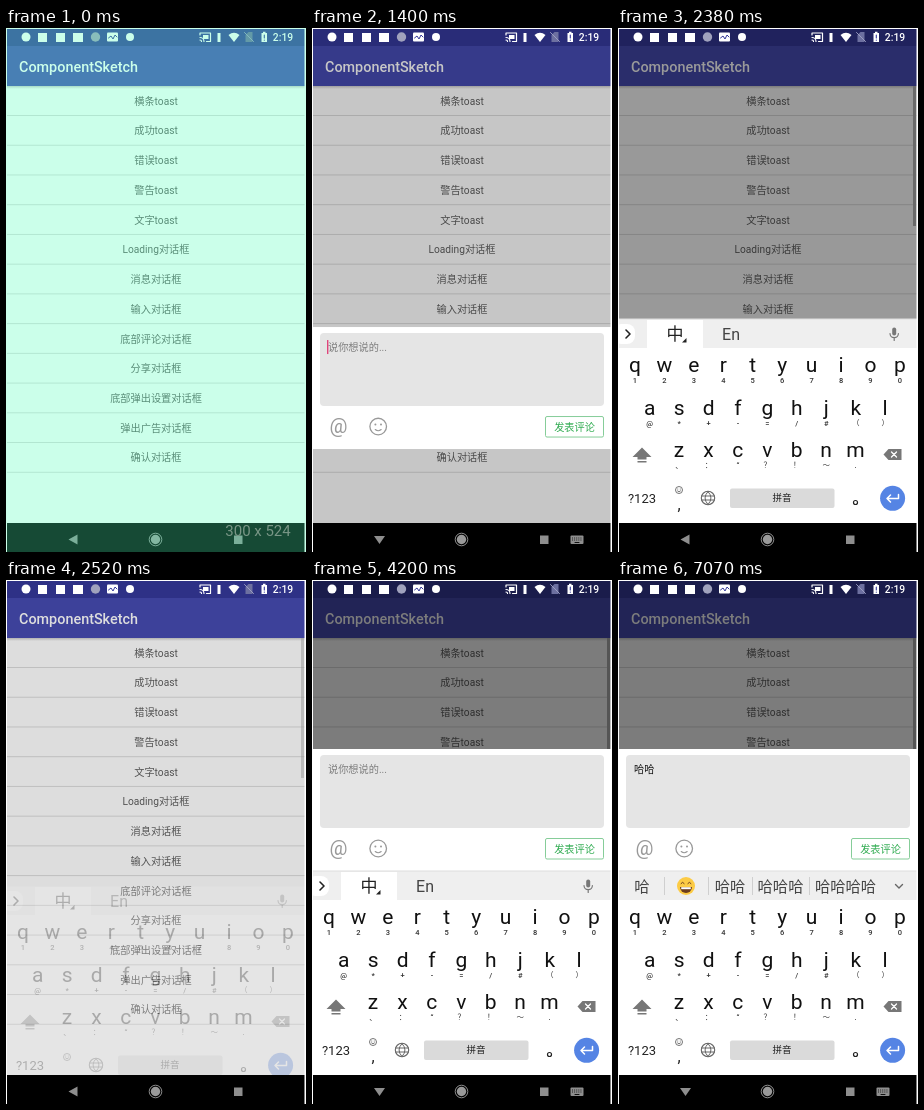
Animation of 300x524 px, one loop 7210 ms. Source, as an HTML page:

```html
<!DOCTYPE html>
<html lang="zh-CN">
<head>
<meta charset="utf-8">
<style>
html, body { margin: 0; width: 100%; height: 100%; overflow: hidden; background: #fff; }
svg { display: block; width: 100%; height: 100%; }
text { font-family: Roboto, "Noto Sans CJK SC", "Noto Sans CJK", sans-serif; text-anchor: middle; white-space: pre; }
.line { fill: none; stroke-linecap: round; stroke-linejoin: round; }
</style>
</head>
<body>
<svg id="stage" viewBox="0 0 300 524"></svg>
<script>
const LOOP = 7210, STEP = 70, ROW = 29.73, DIM = 0.515;
const stage = document.getElementById('stage');

// --- markup helpers ---
const rect = (x, y, w, h, fill, more = '') =>
  `<rect x="${x}" y="${y}" width="${w}" height="${h}" fill="${fill}" ${more}/>`;
const disc = (x, y, r, fill, more = '') => `<circle cx="${x}" cy="${y}" r="${r}" fill="${fill}" ${more}/>`;
const shape = (d, fill) => `<path d="${d}" fill="${fill}"/>`;
const line = (d, color, w = 1.3, more = '') =>
  `<path class="line" d="${d}" stroke="${color}" stroke-width="${w}" ${more}/>`;
// y is the vertical middle of the glyphs
const text = (s, x, y, size, fill, more = '') =>
  `<text x="${x}" y="${y + size * 0.365}" font-size="${size}" fill="${fill}" ${more}>${s}</text>`;
const group = (id, body) => `<g id="${id}">${body}</g>`;
const left = 'style="text-anchor:start"';
const medium = 'font-weight="500"';

// --- list screen ---
const rows = ['横条toast', '成功toast', '错误toast', '警告toast', '文字toast', 'Loading对话框', '消息对话框',
  '输入对话框', '底部评论对话框', '分享对话框', '底部弹出设置对话框', '弹出广告对话框', '确认对话框'];

const screen = rect(0, 0, 300, 524, '#fff') + rect(0, 1, 300, 17, '#35399a') +
  rect(0, 58, 300, 3, 'url(#shade)') + rect(0, 18, 300, 40, '#464bb2') +
  text('ComponentSketch', 13, 38.5, 14.4, '#fff', left + medium) +
  rect(1, 297, 297, 29, '#efefef', 'id="pressed"') +
  rows.map((s, i) => text(s, 150, 73 + ROW * i, 10.2, '#5e5e5e') +
    rect(0, 87 + ROW * i, 300, 1, '#dcdcdc')).join('') +
  rect(295, 58, 3, 140, '#b0b0b0', 'id="scrollbar"');

const status = disc(20, 9, 4.5, '#fff') + rect(32, 5, 9, 9, '#fff') + rect(50, 5, 9, 9, '#fff') +
  rect(67, 5, 10, 9, '#fff') + disc(89.5, 9, 4.7, '#a0a2bd') +
  rect(101, 4.5, 11, 9, '#fff', 'rx="1"') + line('M102.5 10l2.5-2 2 3 2-4 2 2', '#35399a', 1) +
  disc(124, 9, 4, '#fff') +
  line('M194 7V5h10.5v8.500h-4M194 9.500a4 4 0 0 1 4 4M194 12a1.500 1.500 0 0 1 1.500 1.500', '#fff', 1.2) +
  rect(197, 7, 5.500, 4, '#fff') +
  rect(211.5, 5, 3, 9, '#fff') +
  shape('M222.5 7q5.500-4.500 11 0L228 14z', '#fff') +
  shape('M239.5 7l3-3h4v10h-7z', '#6d70a0') + line('M238.5 4.500l9 9', '#9a9cc0', 1) +
  shape('M255.5 5h1.500v-1.200h2.500V5h1.500v9h-5.500z', '#fff') +
  line('M258.3 7v3M258.3 12v.2', '#35399a', 1.1) +
  text('2:19', 277, 9.5, 10.3, '#fff', medium);

const nav = rect(0, 495, 300, 29, '#000') +
  group('backIcon', shape('M62.5 511.500l9-5v10z', '#8e8e8e')) +
  group('imeIcons', shape('M62 508h11l-5.500 8z', '#8e8e8e') +
    rect(258.5, 507.5, 13, 8.5, '#8e8e8e', 'rx="1"') +
    line('M260.5 510h9M260.5 512h9', '#111', 1, 'stroke-dasharray="0.1 2"') +
    line('M263 514.500h4', '#111', 1)) +
  disc(149.5, 511.5, 6.3, 'none', 'stroke="#8e8e8e"') + disc(149.5, 511.5, 4.7, '#9a9a9a') +
  rect(228, 507.5, 8.5, 8.5, '#8e8e8e');

// --- comment sheet, laid out at its resting place ---
const sheet = rect(0, 169, 300, 122, '#fff') + rect(8, 175, 284, 73, '#e5e5e5', 'rx="4"') +
  group('hint', text('说你想说的...', 16, 189.5, 10.2, '#7d7d7d', left)) +
  group('typed', text('哈哈', 16, 189.5, 10.2, '#111', left + medium)) +
  rect(0, 182, 1.4, 14, '#e0457b', 'id="cursor"') +
  text('@', 26.5, 268, 20, '#999') +
  disc(66.2, 268.5, 8.3, 'none', 'stroke="#999" stroke-width="1.300"') +
  disc(63.4, 266.5, 1, '#999') + disc(69, 266.5, 1, '#999') +
  line('M63.2 271.500q3 2.500 6 0', '#999', 1.1) +
  rect(233.5, 258.5, 58, 20.5, '#fff', 'rx="1.500" stroke="#86cd99"') +
  text('发表评论', 262.5, 269, 10.2, '#2fab50', medium);

// --- keyboard ---
const keyRow = (keys, subs, x0, base) => [...keys].map((key, i) => {
  const x = x0 + 29.43 * i;
  return `<text x="${x}" y="${base}" font-size="21" fill="#111">${key}</text>` +
    text(subs[i], x, base + 8, 7.5, '#333', medium);
}).join('');

const divider = x => rect(x, 297, 1, 18, '#cfcfcf');
const candidates = (id, words, first = '#444') => group(id,
  words.map(([s, x], i) => text(s, x, 306, 15.3, i ? '#444' : first)).join('') +
  line('M277.5 304.500l3.500 3.500 3.500-3.500', '#666', 1.4));
const evenly = s => s.split(' ').map((w, i) => [w, 24 + 43.5 * i]);
const evenDividers = [46, 89, 133, 176, 220, 263].map(divider).join('');

const grin = disc(68, 306, 9, '#fccb45') + shape('M62 307h12a6 6 0 0 1-12 0z', '#6b3d1e') +
  rect(63.2, 307.2, 9.6, 2, '#fff') +
  line('M63 303.500q1.600-2.600 3.200 0M69.8 303.500q1.600-2.600 3.200 0', '#6b3d1e', 1);

const bars = group('modeBar',
    rect(-4, 296, 21, 20, '#fff', 'rx="8"') + line('M8 302l4 4-4 4', '#222', 1.6) +
    rect(29, 292, 56, 28, '#fff') + text('中', 57, 306, 17, '#222') + shape('M68.5 310v4.500h-4.500z', '#222') +
    text('En', 113, 306, 16, '#444') +
    rect(274.2, 299.5, 4, 8, '#777', 'rx="2"') +
    line('M272 305.500a4.200 4.200 0 0 0 8.400 0M276.2 310v2.500', '#777', 1.2)) +
  group('wordBar', evenDividers +
    candidates('words1', evenly('好 和 会 还 很 后'), '#111') +
    candidates('words2', evenly('哈哈 呵呵 好好 很好 还好 嘿嘿'), '#111')) +
  group('nextBar', [46, 90, 134, 191].map(divider).join('') + grin +
    candidates('words3', [['哈', 24], ['哈哈', 112], ['哈哈哈', 162.5], ['哈哈哈哈', 227.5]]));

const keyboard = rect(0, 291, 300, 204, '#fff') + rect(0, 291, 300, 29, '#efefef') +
  rect(0, 290.5, 300, 1, '#dedede') + bars +
  keyRow('qwertyuiop', '1234567890', 17, 344) +
  keyRow('asdfghjkl', '@*+-=/#（）', 31.7, 387) +
  keyRow('zxcvbnm', '、：“？！～.', 61, 429) +
  shape('M24 419.500l9.500 9.500h-5v2.500h-9v-2.500h-5z', '#777') + rect(19.5, 433, 9, 1.5, '#777') +
  shape('M265.5 426.500l5-5.500h13v11h-13z', '#777') + line('M273.5 424l5 5m0-5l-5 5', '#fff', 1.3) +
  text('?123', 24, 470, 13, '#222') +
  disc(61, 462, 3.5, 'none', 'stroke="#666" stroke-width=".9"') +
  line('M59.5 463q1.500 1.800 3 0M59.7 461v.1M62.3 461v.1', '#666', 0.9) +
  text(',', 61, 476, 16, '#222') +
  disc(90, 470, 6.7, 'none', 'stroke="#666" stroke-width="1.100"') +
  line('M83.5 468h13M83.5 472h13M90 463.500q-6 6.500 0 13q6-6.500 0-13', '#666', 1) +
  rect(112, 460.5, 104.5, 19.5, '#dadada', 'rx="2"') + text('拼音', 164, 470, 9.5, '#222') +
  disc(237.5, 474.5, 2, 'none', 'stroke="#222" stroke-width="1.200"') +
  disc(274.6, 470.3, 12.5, '#5584e4') +
  line('M280.5 466.500v4H269m3.500-3.500l-3.500 3.500 3.500 3.500', '#fff', 1.5);

stage.innerHTML =
  `<defs><linearGradient id="shade" x2="0" y2="1"><stop stop-color="#000" stop-opacity=".2"/>
  <stop offset="1" stop-opacity="0"/></linearGradient></defs>` +
  screen + disc(0, 0, 17, '#000', 'id="rowTouch" fill-opacity=".1"') +
  rect(0, 0, 300, 524, '#000', 'id="dim"') + status +
  group('sheet', sheet) + group('keyboard', keyboard) + nav +
  disc(0, 0, 17, '#000', 'id="keyTouch" fill-opacity=".1"') +
  rect(0, 0, 1, 524, '#fff') + rect(298.5, 0, 1.5, 524, '#fff') + rect(0, 0, 300, 1, '#fff') +
  group('tint', rect(0, 0, 300, 524, 'rgb(76,255,182)', 'fill-opacity=".29"') +
    text('300 x 524', 252, 503, 15, '#799686'));

// --- animation ---
const el = {};
stage.querySelectorAll('[id]').forEach(e => el[e.id] = e);
const show = (id, on) => el[id].style.display = on ? '' : 'none';
const fade = (id, a) => { show(id, a > 0); el[id].setAttribute('opacity', a); };
const move = (id, x, y) => el[id].setAttribute('transform', `translate(${x} ${y})`);
const ramp = (t, from, ms) => Math.min(1, Math.max(0, (t - from) / ms));
const easeOut = p => 1 - (1 - p) ** 2;
const within = (t, ...spans) => spans.some(([a, b]) => t >= a && t < b);

function draw(t) {
  const again = t >= 3000;
  const opened = again ? 3640 : 1260;
  const closing = again ? 0 : 1;

  fade('tint', 1 - ramp(t, 0, 280));
  show('pressed', within(t, [1050, 1400], [3500, 3780]));
  show('rowTouch', within(t, [980, 1190], [3500, 3640]));
  move('rowTouch', 201, 310);

  fade('dim', DIM * (ramp(t, opened, 325) - closing * ramp(t, 2320, 270)));
  const rise = easeOut(ramp(t, opened, 380)) - closing * ramp(t, 2140, 230) ** 2;
  show('sheet', rise > 0);
  move('sheet', 0, 326 * (1 - rise));

  const keys = easeOut(ramp(t, opened + 170, 250)) - closing * ramp(t, 2400, 160);
  fade('keyboard', keys);
  move('keyboard', 0, 20 * (1 - keys));
  const ime = within(t, [1400, 2310], [3780, LOOP]);
  show('imeIcons', ime);
  show('backIcon', !ime);
  fade('scrollbar', ramp(t, opened + 170, 140) - closing * ramp(t, 2450, 140));

  // typing: two taps on "h", then the first candidate
  const done = t >= 5390;
  show('modeBar', t < 4480);
  show('wordBar', t >= 4480 && !done);
  show('words1', t < 4690);
  show('words2', t >= 4690);
  show('nextBar', done);
  show('hint', !done);
  show('typed', done);
  show('cursor', within(t, [1260, 1750], [3640, 4200], [4690, 5110], [5390, 5880], [6300, 6790]));
  move('cursor', done ? 36.5 : 15, 0);
  const onWord = t > 5000;
  show('keyTouch', within(t, [4480, 4550], [4690, 4830], [5320, 5460]));
  move('keyTouch', onWord ? 24 : 178, onWord ? 306 : 380);
}

const start = performance.now();
function tick() {
  const t = (performance.now() - start) % LOOP;
  draw(Math.floor(t / STEP) * STEP);
  requestAnimationFrame(tick);
}
tick();
</script>
</body>
</html>
```
